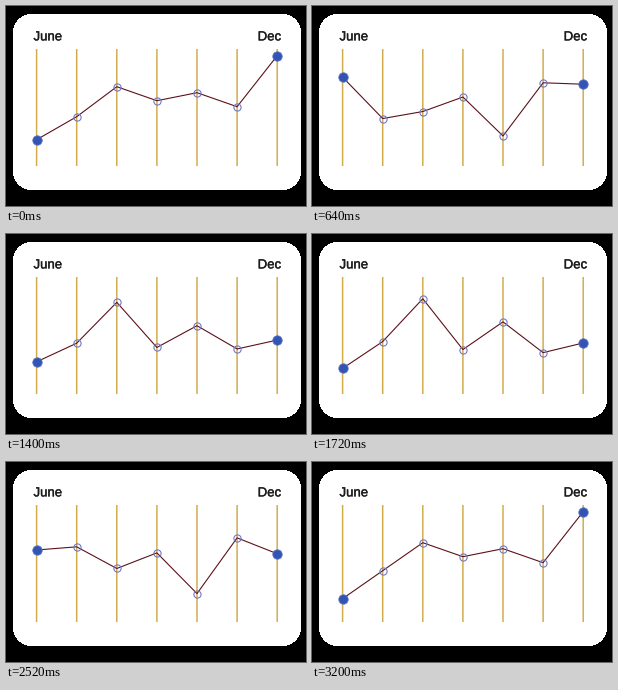
Animation of 300x200 px, one loop 3240 ms. Source, as a matplotlib script:

```python
import matplotlib.pyplot as plt
import numpy as np
from matplotlib.animation import FuncAnimation
from matplotlib.patches import Rectangle
from matplotlib.patheffects import withStroke

W, H, DPI = 300, 200, 100
PX = 72 / DPI  # points per pixel
STEP_MS, FRAMES = 40, 81
SEGMENT_MS = 800

GOLD, BLUE, RING, MAROON, INK = "#d2ab4c", "#3454b4", "#7078c4", "#5c1018", "#1c1c1c"

X = 30.6 + 40.1 * np.arange(7)

# Key poses: the inner months swing between two shapes, the outer ones drift.
START = [134, 111, 81, 95, 87, 101, 50]
DIP = [66, 113, 108, 91, 134, 75, 81]
PEAK = [137, 109, 63, 117, 86, 121, 110]
REBOUND = [86, 84, *DIP[2:6], 94]
END = PEAK[:2] + START[2:]
POSES = np.array([START, DIP, PEAK, REBOUND, END]) - 0.3


def ease(t):
    """Quadratic ease in and out."""
    return 2 * t * t if t < 0.5 else 1 - 2 * (1 - t) ** 2


def heights(ms):
    i = min(ms // SEGMENT_MS, len(POSES) - 2)
    k = ease(ms / SEGMENT_MS - i)
    return POSES[i] + k * (POSES[i + 1] - POSES[i])


fig = plt.figure(figsize=(W / DPI, H / DPI), dpi=DPI, facecolor="black")
ax = fig.add_axes([0, 0, 1, 1])
ax.set_xlim(0, W)
ax.set_ylim(H, 0)
ax.axis("off")


def card(x, y, w, h, r):
    """White panel whose thick round-joined outline makes circular corners."""
    ax.add_patch(Rectangle((x + r, y + r), w - 2 * r, h - 2 * r, color="white",
                           linewidth=2 * r * PX, joinstyle="round",
                           antialiased=False, snap=False))


def label(x, text, align):
    ax.text(x, 34.4, text, ha=align, va="baseline", color=INK,
            family="Liberation Sans", fontsize=13.2 * PX,
            path_effects=[withStroke(linewidth=0.35 * PX, foreground=INK)])


def markers(size, face, edge, width):
    return ax.plot([], [], "o", markersize=size * PX, markerfacecolor=face,
                   markeredgecolor=edge, markeredgewidth=width * PX,
                   snap=False, zorder=3)[0]


card(7, 8, 288, 176, 20)
ax.vlines(X, 43, 160, color=GOLD, linewidth=1.5 * PX, snap=False)
label(27.5, "June", "left")
label(275.3, "Dec", "right")

line, = ax.plot([], [], color=MAROON, linewidth=1.1 * PX, snap=False)
rings = markers(7.2, "none", RING, 1.1)
dots = markers(9.4, BLUE, "#5674c0", 0.8)


def draw(frame):
    y = heights(frame * STEP_MS)
    line.set_data(X, y)
    rings.set_data(X[1:-1], y[1:-1])
    dots.set_data(X[[0, -1]], y[[0, -1]])
    return line, rings, dots


anim = FuncAnimation(fig, draw, frames=FRAMES, interval=STEP_MS,
                     repeat=True, repeat_delay=0)
plt.show()
```
